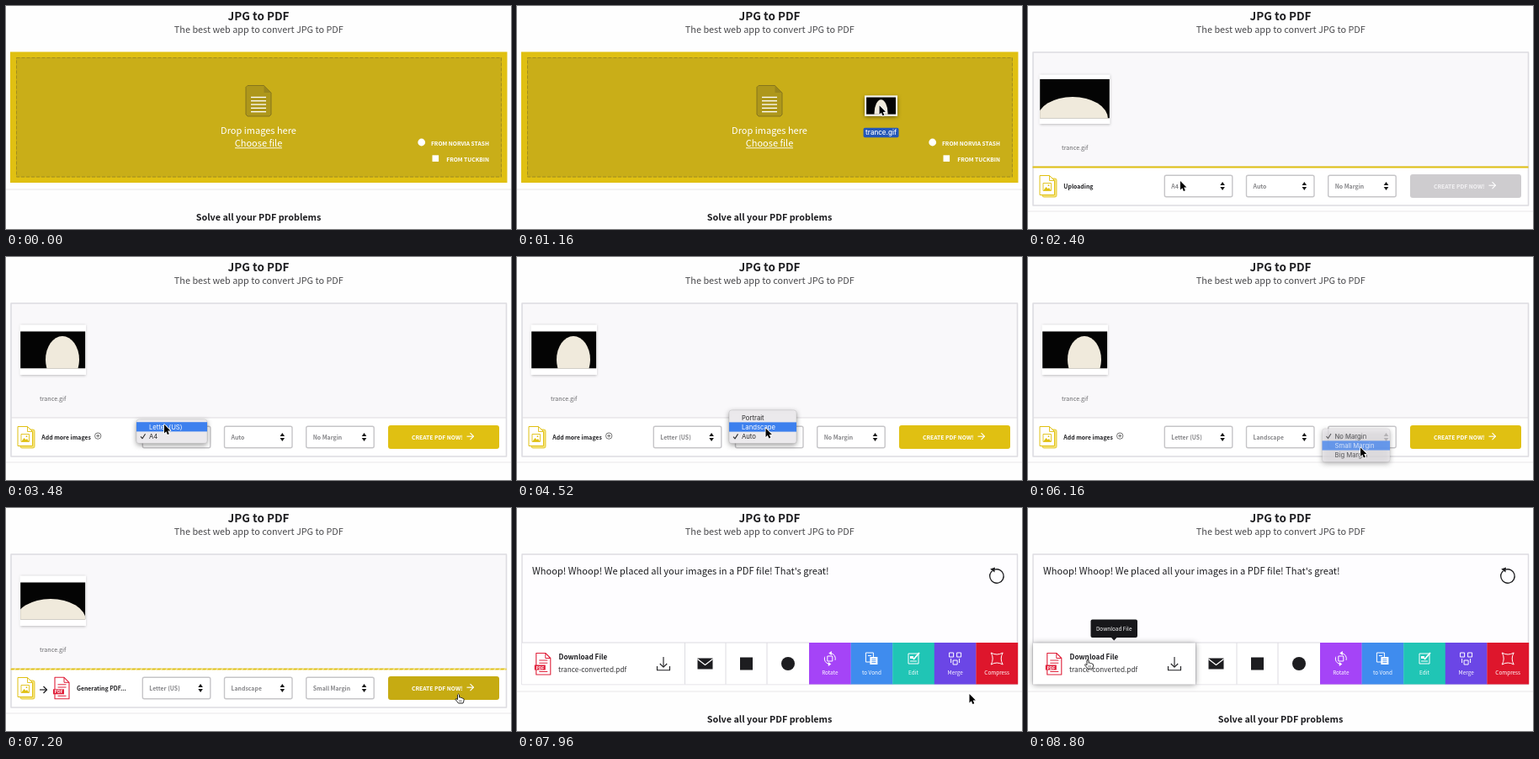
An HTML page with a canvas that plays this animation: 600 px wide and 265 px high, repeating every 9.72 s.

```html
<!DOCTYPE html>
<html lang="en">
<head>
<meta charset="utf-8">
<title>JPG to PDF</title>
<style>
html, body { margin: 0; width: 100%; height: 100%; overflow: hidden; background: #fff; }
canvas { display: block; width: 600px; height: 265px; }
</style>
</head>
<body>
<canvas id="stage"></canvas>
<script>
const LOOP = 9720, W = 600, H = 265;
const cv = document.getElementById('stage'), g = cv.getContext('2d');
const dpr = window.devicePixelRatio || 1;
cv.width = W * dpr;
cv.height = H * dpr;

const SANS = '"Noto Sans CJK JP", "Noto Sans CJK SC", "Noto Sans CJK", "Open Sans", sans-serif';
const UI = 'Inter, Roboto, sans-serif';
const YELLOW = '#e0c012', OLIVE = '#c9ae18', INK = '#1d1d20';

// ---- helpers ----
const clamp = v => Math.max(0, Math.min(1, v));
const mix = (a, b, k) => a + (b - a) * k;
const part = (t, a, b) => clamp((t - a) / (b - a));
const ease = k => k * k * (3 - 2 * k);

function text(s, x, y, size, color, weight = 400, align = 'left', font = SANS) {
  g.font = `${weight} ${size}px ${font}`;
  g.fillStyle = color;
  g.textAlign = align;
  g.textBaseline = 'alphabetic';
  g.fillText(s, x, y);
}
function rect(x, y, w, h, color) {
  g.fillStyle = color;
  g.fillRect(x, y, w, h);
}
function round(x, y, w, h, r, fill, stroke, lw = 1) {
  g.beginPath();
  g.roundRect(x, y, w, h, r);
  if (fill) { g.fillStyle = fill; g.fill(); }
  if (stroke) { g.strokeStyle = stroke; g.lineWidth = lw; g.stroke(); }
}
function shadow(color, blur, dy, draw) {
  g.save();
  g.shadowColor = color;
  g.shadowBlur = blur * dpr;
  g.shadowOffsetY = dy * dpr;
  draw();
  g.restore();
}
// Polyline from a flat list of coordinates
function trace(p, close) {
  g.beginPath();
  for (let i = 0; i < p.length; i += 2) g.lineTo(p[i], p[i + 1]);
  if (close) g.closePath();
}
function line(p, color, lw = 1, close = false) {
  trace(p, close);
  g.strokeStyle = color;
  g.lineWidth = lw;
  g.stroke();
}
function poly(p, color) {
  trace(p, true);
  g.fillStyle = color;
  g.fill();
}
function disc(x, y, r, color) {
  g.beginPath();
  g.arc(x, y, r, 0, 7);
  g.fillStyle = color;
  g.fill();
}
function ring(x, y, r, color, lw, a = 0, b = 2 * Math.PI) {
  g.beginPath();
  g.arc(x, y, r, a, b);
  g.strokeStyle = color;
  g.lineWidth = lw;
  g.stroke();
}
function arrow(x, y, w, color, lw) {
  line([x, y, x + w, y], color, lw);
  line([x + w - 4, y - 4, x + w, y, x + w - 4, y + 4], color, lw);
}

// ---- shared parts ----
function header() {
  text('JPG to PDF', 300, 17, 13.5, INK, 700, 'center');
  text('The best web app to convert JPG to PDF', 300.3, 32, 10.85, '#4a4a4d', 300, 'center');
}
function footer() {
  rect(0, 217.5, W, 1, '#e9e8ea');
  text('Solve all your PDF problems', 300, 255, 10.8, INK, 700, 'center');
}
function picture(x, y, w, h, cx, cy, rx, ry) {
  g.save();
  g.beginPath();
  g.rect(x, y, w, h);
  g.clip();
  rect(x, y, w, h, '#040404');
  g.beginPath();
  g.ellipse(cx, cy, rx, ry, 0, 0, 7);
  g.fillStyle = '#f0eadc';
  g.fill();
  g.restore();
}
function pointer(x, y) {
  g.save();
  g.translate(x, y);
  const p = [0, 0, 0, 10.4, 2.3, 8.3, 3.9, 12, 5.8, 11.2, 4.2, 7.6, 7.4, 7.4];
  g.lineJoin = 'round';
  line(p, '#fff', 1.6, true);
  poly(p, '#000');
  g.restore();
}
function hand(x, y) {
  g.save();
  g.translate(x, y);
  g.lineJoin = 'round';
  g.beginPath();
  g.moveTo(-1, 1);
  g.quadraticCurveTo(0, -0.8, 1, 1);
  g.lineTo(1.2, 4.2);
  g.quadraticCurveTo(2.6, 3.2, 3.3, 4.7);
  g.quadraticCurveTo(4.6, 4, 5, 5.3);
  g.quadraticCurveTo(6.6, 5, 6.6, 6.6);
  g.quadraticCurveTo(6.6, 9, 5.4, 11);
  g.lineTo(0, 11);
  g.quadraticCurveTo(-2, 8.5, -3.6, 6.4);
  g.quadraticCurveTo(-3, 4.8, -1, 6.6);
  g.closePath();
  g.fillStyle = '#fff';
  g.fill();
  g.strokeStyle = '#111';
  g.lineWidth = 0.9;
  g.stroke();
  line([1.3, 7.2, 1.3, 9.4], '#111', 0.6);
  line([3.2, 7.2, 3.2, 9.4], '#111', 0.6);
  g.restore();
}

// ---- drop zone ----
function dropPage(t) {
  rect(5, 54.5, 590.5, 155.5, YELLOW);
  rect(12, 61, 577, 142.5, OLIVE);
  g.setLineDash([4, 2]);
  g.strokeStyle = '#a18d20';
  g.lineWidth = 1;
  g.strokeRect(12.5, 61.5, 576, 141.5);
  g.setLineDash([]);

  const page = [287, 94.5, 306.5, 94.5, 315, 103, 315, 129, 313, 131, 287, 131, 285, 129, 285, 96.5];
  poly(page, '#ae971b');
  line(page, '#85751d', 1, true);
  poly([306.5, 94.5, 306.5, 103, 315, 103], '#9a861c');
  for (let i = 0; i < 5; i++) rect(291, 107.8 + i * 4.3, 18, 1.3, '#fff');

  text('Drop images here', 300, 152, 11, '#fff', 400, 'center');
  text('Choose file', 300, 167, 11, '#fff', 400, 'center');
  rect(272, 168.3, 56, 0.9, '#fff');
  disc(493.7, 162, 4.4, '#fff');
  text('FROM NORVIA STASH', 574, 165.8, 6.7, '#fff', 700, 'right');
  rect(506.5, 177.3, 7.6, 7.6, '#fff');
  text('FROM TUCKBIN', 574, 184.8, 6.7, '#fff', 700, 'right');
  footer();

  if (t >= 560) {
    const e = Math.pow(part(t, 560, 1520), 1.13);
    dragged(mix(624, 299, e), 111 + 52 * Math.pow(1 - e, 2.2));
  }
}
function dragged(x, y) {
  shadow('rgba(0,0,0,.55)', 5, 1.5, () => rect(x - 19.5, y - 12, 39, 24.5, '#f5f4f0'));
  picture(x - 17.5, y - 10, 35, 20.5, x, y + 9, 8, 16);
  round(x - 21, y + 26.5, 42, 11.5, 2, '#2457b8');
  text('trance.gif', x, y + 35, 8, '#fff', 500, 'center', UI);
  pointer(x - 2, y);
}

// ---- editor ----
const FADE = 160;
const menus = [
  { x: 155, y: 193, w: 84, items: ['Letter (US)', 'A4'], sel: 1, pick: 0, open: 2960, hover: 3240, close: 3520 },
  { x: 252, y: 182, w: 80, items: ['Portrait', 'Landscape', 'Auto'], sel: 2, pick: 1, open: 4120, hover: 4400, close: 4560 },
  { x: 349.5, y: 204, w: 80.5, items: ['No Margin', 'Small Margin', 'Big Margin'], sel: 0, pick: 1, open: 5440, hover: 5900, close: 6120 }
];

function menu(m, t) {
  const h = m.items.length * 11.2 + 6;
  g.globalAlpha = 1 - part(t, m.close, m.close + FADE);
  shadow('rgba(0,0,0,.4)', 6, 2, () => round(m.x, m.y, m.w, h, 3, '#ebe9ec', 'rgba(0,0,0,.15)', 0.6));
  const lit = t >= m.hover ? m.pick : m.sel;
  m.items.forEach((s, i) => {
    const y = m.y + 3.2 + i * 11.2, on = i === lit, col = on ? '#fff' : '#2a2a2c';
    if (on) rect(m.x, y, m.w, 11.2, '#3d80ee');
    if (i === m.sel) line([m.x + 5, y + 6, m.x + 7, y + 8.3, m.x + 10.5, y + 2.8], col, 1.1);
    text(s, m.x + 15, y + 8.6, 7.7, col, 400, 'left', UI);
  });
  g.globalAlpha = 1;
}
function select(m, i, t) {
  const x = 162.3 + i * 97.2;
  round(x, 201.2, 80.5, 25.6, 2, '#fff', '#c6c5c8', 1.4);
  text(m.items[t >= m.close + FADE ? m.pick : m.sel], x + 8, 216.8, 6.9, '#858588', 700);
  poly([x + 66, 213, x + 68.8, 209, x + 71.6, 213], '#1b1b1b');
  poly([x + 66, 215, x + 68.8, 219, x + 71.6, 215], '#1b1b1b');
}
function imageIcon(x, y) {
  g.lineJoin = 'round';
  round(x + 3, y + 3.5, 17, 22, 2, '#f6e582', YELLOW, 0.8);
  const p = [x, y, x + 11.5, y, x + 17.5, y + 6, x + 17.5, y + 23, x, y + 23];
  poly(p, '#fff');
  line(p, YELLOW, 1, true);
  line([x + 11.5, y, x + 11.5, y + 6, x + 17.5, y + 6], YELLOW, 0.9);
  g.strokeRect(x + 4, y + 9, 9.5, 9);
  poly([x + 4.5, y + 17.5, x + 7.5, y + 13.5, x + 9.5, y + 15.8, x + 11, y + 14.5, x + 13, y + 17.5], YELLOW);
  disc(x + 10.5, y + 11.7, 0.9, YELLOW);
}
function pdfIcon(x, y) {
  const red = '#e0203a';
  const p = [x + 2, y, x + 13, y, x + 19, y + 6, x + 19, y + 25.5, x + 2, y + 25.5];
  g.lineJoin = 'round';
  poly(p, '#fff');
  line(p, red, 1.1, true);
  line([x + 13, y, x + 13, y + 6, x + 19, y + 6], red, 1);
  for (let i = 0; i < 2; i++) rect(x + 5.5, y + 8 + i * 3.2, 10, 1, red);
  rect(x + 5.5, y + 21.5, 10, 1, red);
  rect(x, y + 14, 13, 6, red);
  text('PDF', x + 6.5, y + 19.1, 5, '#fff', 700, 'center');
}
function thumbnail(t) {
  const up = 1 - part(t, 2640, 2800);
  const x = mix(16.5, 13.5, up), w = mix(78.5, 84, up), y = mix(80.5, 81.5, up);
  shadow('rgba(0,0,0,.25)', 3, 0.5, () => rect(x, y, w, 140 - y, '#fff'));
  const k = ease(part(t, 2760, 3040)) - ease(part(t, 6720, 6960));
  const top = mix(88.3, 86.8, up), low = mix(132.6, 133.6, up);
  picture(x + 0.6, top, w - 1.2, low - top, mix(53, 67, k), mix(134, 122, k), mix(42, 20, k), mix(26, 28, k));
  text('trance.gif', 55.7, 170.6, 7.15, '#6a6a6d', 400, 'center');
}
function editPage(t) {
  rect(5.5, 54.5, 589.5, 183, '#fff');
  rect(6, 55, 588, 136, '#f9f8fa');
  rect(6, 190.5, 588, 1, '#dddce0');
  g.strokeStyle = '#dddce1';
  g.lineWidth = 1.6;
  g.strokeRect(6, 55, 588.5, 182);
  rect(0, 243.5, W, 1, '#ebeaec');
  thumbnail(t);

  const loading = t < 2720, making = t >= 6840, bar = 190.5;
  if (loading) rect(5.5, bar, 589 * ease(part(t, 1720, 2320)), 2, YELLOW);
  if (making) {
    rect(5.5, bar, 589, 2, '#f1df80');
    const shift = (t / 50) % 6;
    g.save();
    g.beginPath();
    g.rect(5.5, bar, 589, 2);
    g.clip();
    for (let x = shift - 1; x < 596; x += 6) poly([x, bar + 2, x + 1.5, bar, x + 5.5, bar, x + 4, bar + 2], YELLOW);
    g.restore();
  }

  imageIcon(14, 201.5);
  if (making) {
    arrow(40, 216, 8.5, INK, 1.2);
    pdfIcon(56, 201.3);
    text('Generating PDF...', 84, 216.8, 6.9, INK, 700);
  } else {
    text(loading ? 'Uploading' : 'Add more images', 42.3, 216.8, 6.9, INK, 700);
    if (!loading) {
      ring(109.2, 212.6, 3.7, '#555', 0.8);
      line([107.2, 212.6, 111.2, 212.6], '#555', 0.8);
      line([109.2, 210.6, 109.2, 214.6], '#555', 0.8);
    }
  }
  menus.forEach((m, i) => select(m, i, t));

  const over = t >= 6560;
  round(454, 200, 132, 28, 3, loading ? '#cecccf' : over ? '#c6ab12' : YELLOW);
  text('CREATE PDF NOW!', 482, 216.6, 6.75, loading ? '#f3f2f4' : '#fff', 700);
  arrow(547.5, 213.2, 8, '#fff', 1.1);

  const open = menus.find(m => t >= m.open && t < m.close + FADE);
  if (open) menu(open, t);
}

// ---- result ----
const tiles = [
  ['Rotate', '#a544f7'], ['to Vond', '#3f8cee'], ['Edit', '#20c5b5'], ['Merge', '#6b46e6'], ['Compress', '#de162c']
];
function box(x, y, w, h) {
  g.strokeStyle = '#fff';
  g.lineWidth = 1;
  g.strokeRect(x, y, w, h);
}
const tileIcons = [
  x => {
    box(x - 3, 176, 6, 6);
    ring(x, 179, 6.5, '#fff', 1, -1.3, 0.3);
    ring(x, 179, 6.5, '#fff', 1, 1.8, 3.5);
    poly([x - 1.5, 172.6, x + 2, 170, x + 2, 175], '#fff');
    poly([x + 1.5, 185.4, x - 2, 183, x - 2, 188], '#fff');
  },
  x => {
    box(x - 7, 172, 9, 11);
    rect(x - 2, 177, 9, 9, '#fff');
    for (let i = 0; i < 3; i++) rect(x, 179 + i * 2, 5, 0.8, '#3f8cee');
    line([x - 4.5, 175.5, x - 0.5, 175.5], '#fff', 1);
  },
  x => {
    box(x - 6, 173, 12, 12);
    rect(x - 4, 176, 4, 3, '#fff');
    line([x - 4, 182, x + 4, 182], '#fff', 1);
    line([x, 180, x + 7, 172], '#fff', 1.8);
  },
  x => {
    box(x - 7, 172, 5, 5);
    box(x + 2, 172, 5, 5);
    box(x - 2.5, 181, 5, 5);
    line([x - 5, 179, x - 5, 184], '#fff', 1);
    line([x + 5, 179, x + 5, 184], '#fff', 1);
  },
  x => {
    g.beginPath();
    g.moveTo(x - 7, 172);
    g.quadraticCurveTo(x, 176, x + 7, 172);
    g.quadraticCurveTo(x + 3, 179, x + 7, 186);
    g.quadraticCurveTo(x, 182, x - 7, 186);
    g.quadraticCurveTo(x - 3, 179, x - 7, 172);
    g.strokeStyle = '#fff';
    g.lineWidth = 1;
    g.stroke();
  }
];
function resultPage(t) {
  rect(6, 55, 588.5, 154.5, '#fefdff');
  g.strokeStyle = '#dddce1';
  g.lineWidth = 1.4;
  g.strokeRect(6, 55, 588.5, 154.5);
  text("Whoop! Whoop! We placed all your images in a PDF file! That's great!", 18, 79.2, 11.1, INK);
  ring(570, 81, 8.2, INK, 1.3, -1.9, 4);
  poly([562.2, 72.6, 568, 70.6, 567.4, 76.4], INK);

  rect(6, 160, 341, 49.5, '#fff');
  rect(6, 159.5, 341, 1, '#dddce1');
  for (const x of [199, 247.5, 296.5]) rect(x, 160, 1, 49.5, '#dddce1');
  rect(214.5, 178.5, 18, 13, INK);
  line([214.5, 179.5, 223.5, 186.5, 232.5, 179.5], '#fff', 1.2);
  rect(265, 177.5, 15, 15, INK);
  disc(322, 185, 8, INK);
  tiles.forEach(([name, color], i) => {
    const x = 347 + i * 49.6;
    rect(x, 160, 49.8, 49.5, color);
    tileIcons[i](x + 24.8);
    text(name, x + 24.8, 197.6, 6.4, '#fff', 400, 'center');
  });
  footer();

  const k = part(t, 8600, 8760);
  if (k) {
    g.globalAlpha = k;
    shadow('rgba(0,0,0,.4)', 7, 0.5, () => rect(6, 160.5, 193, 49, '#fff'));
    g.globalAlpha = 1;
  }
  pdfIcon(20.8, 172.5);
  text('Download File', 49.5, 180.2, 8.25, INK, 700);
  text('trance-converted.pdf', 49, 195.2, 8.25, '#333336');
  line([174, 177, 174, 189], INK, 1.1);
  line([169.8, 185, 174, 189.2, 178.2, 185], INK, 1.1);
  line([166.5, 188, 166.5, 192.8, 181.5, 192.8, 181.5, 188], INK, 1.1);
  if (k) {
    g.globalAlpha = k;
    round(74.5, 132.5, 55.5, 21.5, 2, '#17171a');
    poly([98.5, 153.5, 106, 153.5, 102.2, 157.5], '#17171a');
    text('Download File', 102.2, 145.6, 6.4, '#fff', 400, 'center');
    g.globalAlpha = 1;
  }
}

// Each row: start, end, x, y reached
const moves = [
  [1760, 2320, 181, 208], [3040, 3320, 188, 199], [3600, 4000, 286, 208],
  [4240, 4500, 295.5, 203.5], [4800, 5300, 386, 208], [5720, 6080, 395, 226.5],
  [6320, 6660, 537.5, 221], [8320, 8740, 71, 180]
];
function cursor(t) {
  let x = 297, y = 111;
  for (const [a, b, tx, ty] of moves) {
    const k = ease(part(t, a, b));
    x = mix(x, tx, k);
    y = mix(y, ty, k);
  }
  const link = t < 7760 ? t >= 6560 : y < 209;
  (link ? hand : pointer)(x, y);
}

function draw(t) {
  g.setTransform(dpr, 0, 0, dpr, 0, 0);
  rect(0, 0, W, H, '#fefefe');
  header();
  if (t < 1720) return dropPage(t);
  if (t < 7760) editPage(t);
  else resultPage(t);
  cursor(t);
}
function tick() {
  draw(performance.now() % LOOP);
  requestAnimationFrame(tick);
}
tick();
</script>
</body>
</html>
```
